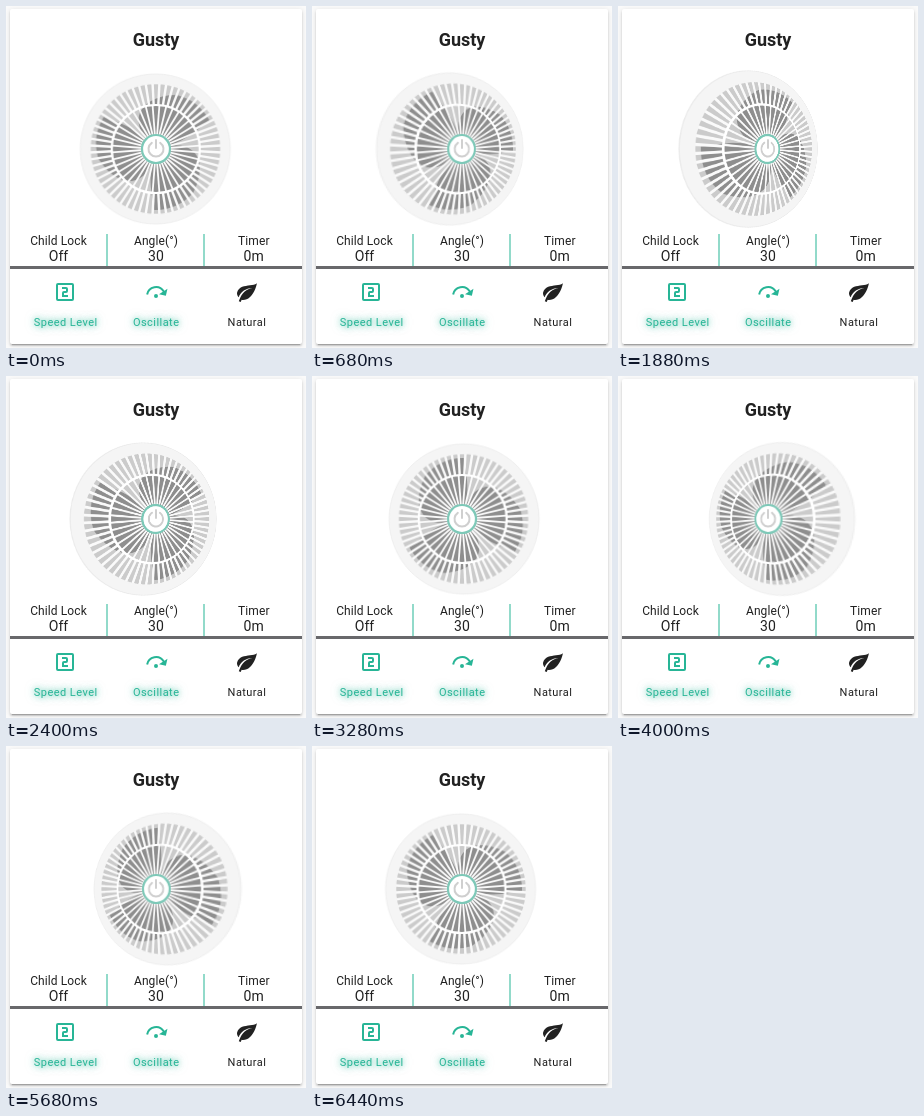
An HTML page for the animation above (6480 ms loop, 300 px wide and 342 px high).

```html
<!DOCTYPE html>
<html lang="en">
<head>
<meta charset="utf-8">
<title>Fan card</title>
<style>
  html, body { margin: 0; width: 100%; height: 100%; overflow: hidden; background: #fafafa; }
  .card {
    position: absolute; left: 4px; top: 3px; width: 292px; height: 335px;
    background: #fff; border-radius: 2px;
    box-shadow: 0 2px 2px rgba(0,0,0,.14), 0 1px 5px rgba(0,0,0,.12), 0 3px 1px -2px rgba(0,0,0,.2);
  }
  svg { position: absolute; display: block; }
  #panel { left: 0; top: 0; font-family: Roboto, "Noto Sans", sans-serif; fill: #212121; }
  #panel text { text-anchor: middle; font-size: 12px; letter-spacing: .1px; }
  #panel .title { font-size: 18px; font-weight: 700; letter-spacing: 0; }
  #panel .value { font-size: 14px; }
  #panel .button { font-size: 11px; letter-spacing: .45px; }
  .on { fill: #27b596; }
  text.on { text-shadow: 0 0 5px rgba(39,181,150,.6), 0 0 10px rgba(39,181,150,.6); }
  #fan { left: 70px; top: 63px; }
</style>
</head>
<body>
<div class="card"></div>

<svg id="panel" width="300" height="342" viewBox="0 0 300 342">
  <text class="title" x="150" y="40">Gusty</text>

  <text x="52.5" y="239">Child Lock</text><text class="value" x="52.5" y="255">Off</text>
  <text x="150" y="239">Angle(°)</text><text class="value" x="150" y="255">30</text>
  <text x="247.8" y="239">Timer</text><text class="value" x="247.8" y="255">0m</text>
  <path class="on" d="M100.5 228h1v32h-1zM197.5 228h1v32h-1z"/>
  <rect x="4" y="260" width="292" height="3" fill="#68686b"/>

  <path class="on" transform="translate(47 274)" d="M15 11V9a2 2 0 0 0-2-2H9v2h4v2h-2a2 2 0 0 0-2 2v4h6v-2h-4v-2h2a2 2 0 0 0 2-2M19 19H5V5h14M19 3H5a2 2 0 0 0-2 2v14a2 2 0 0 0 2 2h14a2 2 0 0 0 2-2V5a2 2 0 0 0-2-2z" fill-rule="evenodd"/>
  <path class="on" transform="translate(138 274)" d="M12 14a2 2 0 1 1 0 4 2 2 0 0 1 0-4M23.46 8.86l-1.59 6.89L15 14.16l3.8-2.38A8 8 0 0 0 4.12 14.63l-1.97-.35A10 10 0 0 1 20.5 10.72z"/>
  <path transform="translate(229 274)" d="M17 8C8 10 5.9 16.17 3.82 21.34l1.89.66.95-2.3c.48.17.98.3 1.34.3C19 20 22 3 22 3c-1 2-8 2.25-13 3.25S2 11.5 2 13.5s1.75 3.75 1.75 3.75C7 8 17 8 17 8z"/>

  <text class="button on" x="59.7" y="320">Speed Level</text>
  <text class="button on" x="150.2" y="320">Oscillate</text>
  <text class="button" x="241" y="320">Natural</text>
</svg>

<svg id="fan" width="160" height="160" viewBox="-80 -80 160 160">
  <circle r="75" fill="#f5f5f5" stroke="#ebebeb" stroke-width=".8"/>
  <circle r="65.5" fill="#cbcbcb"/>
  <g id="blades" fill="#8e8e8e"></g>
  <g id="grill" stroke="#fafafa" fill="none"></g>
  <circle r="44" fill="none" stroke="#fff" stroke-width="2.2"/>
  <circle r="65.5" fill="none" stroke="#f5f5f5" stroke-width="1.5"/>
  <circle r="14" fill="#fff" stroke="#7cc8b7" stroke-width="2.2"/>
  <path d="M-4.2 -6.2A7.5 7.5 0 1 0 4.2 -6.2M0 -9V-1" fill="none" stroke="#cfcfcf" stroke-width="2" stroke-linecap="round"/>
</svg>

<script>
  const LOOP = 6480, TICK = 40;   // ms
  const SWING = 40;               // degrees to each side
  const SPIN = 30;                // blade degrees per tick
  const fan = document.getElementById('fan');
  const blades = document.getElementById('blades');
  const grill = document.getElementById('grill');

  function addPath(parent, d, angle, width) {
    const path = document.createElementNS('http://www.w3.org/2000/svg', 'path');
    path.setAttribute('d', d);
    path.setAttribute('transform', `rotate(${angle})`);
    if (width) path.setAttribute('stroke-width', width);
    parent.append(path);
  }

  function addBars(count, from, to, width) {
    for (let i = 0; i < count; i++) {
      addPath(grill, `M0 ${-from}V${-to}`, (i + 0.5) * 360 / count, width);
    }
  }

  for (let i = 0; i < 3; i++) {
    addPath(blades, 'M0 0C-42 -8 -40 -38 -10 -57Q12 -64 32 -52C27 -42 25 -22 0 0', i * 120);
  }
  addBars(40, 13, 44, 1.8);
  addBars(60, 44, 66, 2.4);

  // Triangle wave: one degree per tick, turning back at each end.
  function swingAngle(tick) {
    return SWING - Math.abs((tick + SWING) % (4 * SWING) - 2 * SWING);
  }

  const start = performance.now();
  function draw() {
    const tick = Math.floor((performance.now() - start) % LOOP / TICK);
    fan.style.transform = `perspective(140px) rotateY(${swingAngle(tick + 1)}deg)`;
    blades.setAttribute('transform', `rotate(${30 + tick * SPIN})`);
    requestAnimationFrame(draw);
  }
  draw();
</script>
</body>
</html>
```
